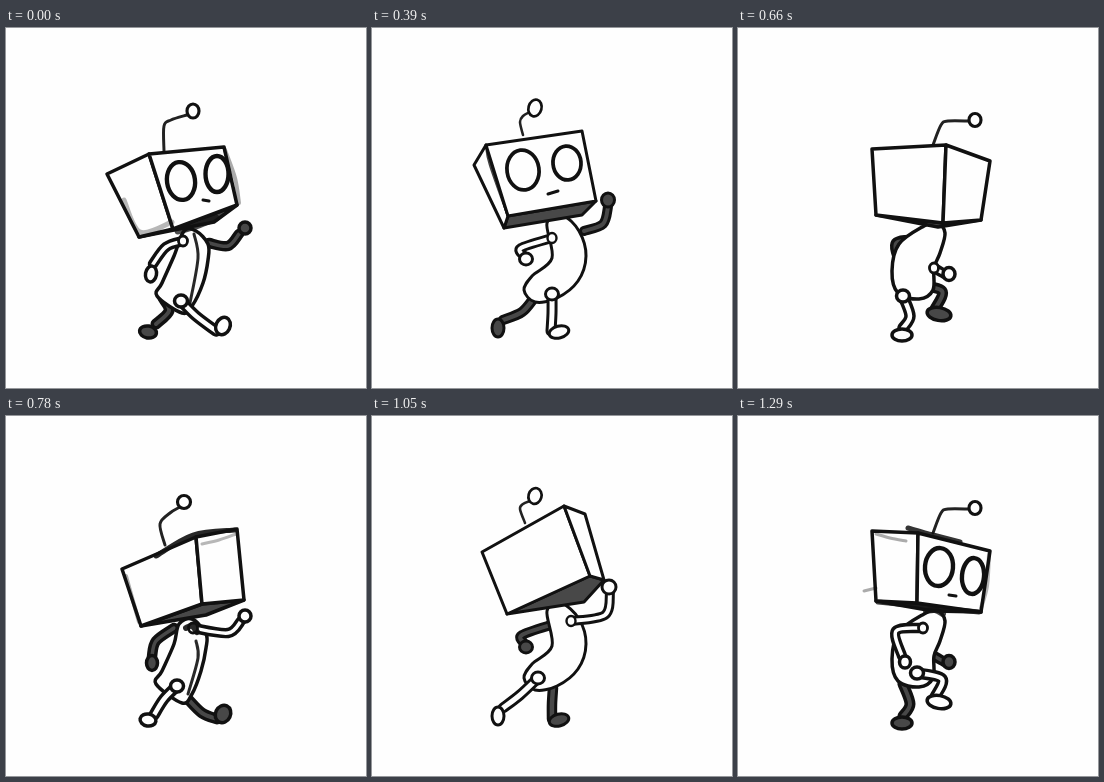
Animation, 360 px wide and 360 px high, one loop 1410 ms. Source, as an HTML page with a canvas:

```html
<!DOCTYPE html>
<html lang="en">
<head>
<meta charset="utf-8">
<title>Running robot</title>
<style>
  html, body { margin: 0; width: 100%; height: 100%; overflow: hidden; background: #fefefe; }
  canvas { display: block; width: 360px; height: 360px; }
</style>
</head>
<body>
<canvas id="stage"></canvas>
<script>
const INK = '#111', PAPER = '#fefefe', SHADE = '#484848';
const canvas = document.getElementById('stage');
const ctx = canvas.getContext('2d');
const ratio = window.devicePixelRatio || 1;
canvas.width = canvas.height = 360 * ratio;
ctx.scale(ratio, ratio);
ctx.lineCap = ctx.lineJoin = 'round';

// Turns every string of numbers inside a pose into an array
function parse(v) {
  if (typeof v === 'string') return v.split(' ').map(Number);
  if (Array.isArray(v)) return v.map(parse);
  if (v && typeof v === 'object')
    return Object.fromEntries(Object.entries(v).map(([k, x]) => [k, parse(x)]));
  return v;
}

function mix(a, b, t) {
  if (typeof a === 'number') return a + (b - a) * t;
  if (Array.isArray(a)) return a.map((x, i) => mix(x, b[i], t));
  return Object.fromEntries(Object.keys(a).map(k => [k, mix(a[k], b[k], t)]));
}

// box: TL TM TR BR BM BL + underside point; limbs: arm, hand, leg, foot
const robot = (lw, skull, body, near, far, marks = []) =>
  ({ ...parse({ lw, skull, body, near, far }), marks: parse(marks) });
const between = (a, b, t) => ({ ...mix({ ...a, marks: [] }, { ...b, marks: [] }, t) });
const swapLimbs = (p, skull, lw = p.lw) =>
  ({ ...p, lw, skull, near: p.far, far: p.near, marks: [] });

const strideFront = robot(3.5, {
  box: '101 146 143 126 218 119 231 177 167 201 133 209 208 194',
  wire: '158 123 158 98 165 92 181 87', ball: '187 83 6 7 0',
  face: { eyes: ['175 153 14 19 -8', '211 146 11.5 18 0'], mouth: '197 172 203 173' }
}, '178 203 190 203 202 216 202 232 197 255 186 278 176 285 151 268 156 255 168 228',
  ['177 213 160 219 147 236', '145 246 5.5 8 10', '175 273 190 288 210 303', '217 298 7 9 25'],
  ['203 215 222 218 233 206', '239 200 6 6 0', '157 270 163 283 150 296', '142 304 8.5 6 10'],
  [[5, .3, '118 172 134 204 166 194'], [4, .35, '219 122 229 150 233 175'],
   [7, .75, '172 203 190 198 210 190'], [3, .9, '188 206 192 230 184 275']]);

const pushFront = robot(3.2, {
  box: '102 135 134 116 211 114 228 173 154 190 128 201 205 191',
  wire: '156 113 154 97 159 92 168 87', ball: '174 83 6 8 0',
  face: { eyes: ['166 145 14 19 -5', '203 140 11 17 0'], mouth: '190 171 198 170' }
}, '173 193 189 188 202 203 206 228 202 252 186 272 165 273 151 260 158 247 174 225',
  ['178 211 142 216 131 234', '131 240 6 6.5 0', '178 267 185 285 194 304', '202 304 9 5 -30'],
  ['205 209 225 202 238 190', '244 185 6.5 6.5 0', '160 268 152 284 138 294', '134 302 6.5 9 0'],
  [[6, .85, '135 119 144 152 154 189'], [6, .85, '211 122 218 140 227 171'],
   [2, .5, '156 146 162 155 176 160']]);

const leanFront = robot(3, {
  box: '102 137 114 117 210 103 224 173 136 188 132 200 210 187',
  wire: '151 107 148 94 151 88 158 84', ball: '163 80 6.5 8.5 15',
  face: { eyes: ['151 142 16 20 -8', '195 135 14 17 -5'], mouth: '176 166 186 163' }
}, '175 195 191 188 207 203 214 228 206 253 185 270 163 274 152 262 160 248 180 230',
  ['180 210 149 220 152 228', '154 231 6.5 6 0', '180 266 180 285 179 303', '187 304 10 6 -15'],
  ['212 203 231 196 236 179', '236 172 6.5 7 0', '162 270 150 284 131 292', '126 300 6 9 0'],
  [[2.5, .8, '114 117 118 137 136 188']]);

const passFront = robot(2.5, {
  box: '106 137 136 121 221 108 234 177 160 184 137 201 210 191',
  wire: '156 111 152 98 158 93 167 88', ball: '173 82 8 8.5 0',
  face: { eyes: ['166 142 15 18 0', '205 136 14 15 0'], mouth: '191 172 201 171' }
}, '182 197 194 189 204 200 207 225 202 250 191 268 170 270 154 255 157 238 172 212',
  ['180 210 160 230 176 241', '181 243 5.5 6 0', '177 267 184 281 172 299', '174 306 10 5.5 0'],
  ['206 214 217 227 236 215', '244 213 7 7 0', '188 270 184 281 161 285', '153 290 5.5 9 15']);

const strideBack = robot(3.5, {
  box: '116 153 190 121 231 113 238 184 196 188 135 210 200 199',
  wire: '159 129 154 108 164 97 174 91', ball: '178 86 6.5 6.5 0'
}, '173 208 186 203 200 218 200 232 195 255 186 278 176 287 150 268 156 255 168 228',
  ['187 212 222 217 235 205', '239 200 6 6 0', '171 270 158 283 148 299', '142 304 8 6 10'],
  ['168 212 150 225 146 240', '146 247 5.5 7.5 0', '181 282 196 297 211 303', '217 298 7.5 9 25'],
  [[5, .9, '150 140 187 119 229 114'], [3, .3, '196 128 213 124 230 118'],
   [4, .35, '120 160 127 185 133 206'], [6, .9, '180 212 186 210 191 216'],
   [3, .9, '190 225 192 242 182 278']]);

const leanBack = robot(3, {
  box: '110 136 192 90 218 161 218 161 218 161 135 198 208 186',
  wire: '153 107 148 93 151 88 158 85', ball: '163 80 6.5 8 15'
}, '175 195 189 187 207 203 214 228 206 253 185 270 163 274 152 262 160 248 180 230',
  ['199 205 233 199 238 176', '237 171 7 7 0', '166 262 148 279 131 292', '126 300 6 9 0'],
  ['182 208 150 219 152 227', '154 231 6.5 6 0', '181 272 180 288 180 303', '187 304 10 6 -15']);
leanBack.skull.box = parse('110 136 192 90 213 98 232 164 218 160 135 198 212 186');

const passHigh = robot(3.5, {
  box: '134 115 180 117 252 135 243 196 179 187 138 185 195 195',
  wire: '195 117 203 97 210 93 231 93', ball: '237 92 6 6.5 0',
  face: { eyes: ['201 151 14 19 5', '235 160 11 18 5'], mouth: '211 179 218 180' }
}, '186 198 199 194 207 205 202 225 196 240 195 262 181 271 160 265 154 243 161 216',
  ['185 212 158 215 164 240', '167 246 5.5 6 0', '179 257 204 263 197 281', '201 286 12 6.5 10'],
  ['196 240 203 244 207 246', '211 246 6 6.5 0', '165 268 172 288 165 300', '164 307 10 6 0'],
  [[5, .85, '170 112 195 119 222 126'], [3, .35, '126 175 138 172'],
   [4, .3, '251 138 249 170 243 192'], [3, .35, '138 118 152 122 168 125'],
   [6, .8, '188 195 197 194 205 198'], [5, .8, '140 186 180 190 241 196']]);

const highBackSkull = {
  ...passHigh.skull, face: undefined,
  box: parse('134 121 208 117 252 133 243 192 205 195 138 187 200 199')
};
const pushBack = between(strideBack, leanBack, .5);
const passBackSkull = mix(strideBack.skull, leanBack.skull, .6);

const steps = [
  [150, strideFront],
  [120, between(strideFront, pushFront, .5)],
  [120, pushFront],
  [150, leanFront],
  [120, passFront],
  [120, swapLimbs(passHigh, highBackSkull)],
  [120, strideBack],
  [150, pushBack],
  [120, leanBack],
  [120, swapLimbs(passFront, passBackSkull, 3)],
  [120, passHigh]
];
const loop = steps.reduce((sum, [ms]) => sum + ms, 0);

function paint(fill, width, color = INK) {
  if (fill) { ctx.fillStyle = fill; ctx.fill(); }
  if (width) { ctx.strokeStyle = color; ctx.lineWidth = width; ctx.stroke(); }
}

const pairs = flat => Array.from({ length: flat.length / 2 }, (_, i) => [flat[2 * i], flat[2 * i + 1]]);

// Catmull-Rom curve through the points
function curve(flat, closed) {
  const p = pairs(flat), n = p.length;
  const at = i => closed ? p[(i + n) % n] : p[Math.max(0, Math.min(n - 1, i))];
  ctx.beginPath();
  ctx.moveTo(...p[0]);
  for (let i = 0; i < (closed ? n : n - 1); i++) {
    const [a, b, c, d] = [at(i - 1), at(i), at(i + 1), at(i + 2)];
    ctx.bezierCurveTo(b[0] + (c[0] - a[0]) / 6, b[1] + (c[1] - a[1]) / 6,
      c[0] - (d[0] - b[0]) / 6, c[1] - (d[1] - b[1]) / 6, ...c);
  }
}

function polygon(points, fill, width) {
  ctx.beginPath();
  points.forEach(p => ctx.lineTo(...p));
  ctx.closePath();
  paint(fill, width);
}

function oval([x, y, rx, ry, turn = 0], fill, width) {
  ctx.beginPath();
  ctx.ellipse(x, y, rx, ry, turn * Math.PI / 180, 0, 7);
  paint(fill, width);
}

function limb(path, end, thick, fill, lw) {
  curve(path);
  paint(null, thick + lw);
  paint(null, thick - lw, fill);
  oval(end, fill, lw);
}

function drawSkull({ box, wire, ball, face }, lw) {
  const [tl, tm, tr, br, bm, bl, under] = pairs(box);
  curve(wire);
  paint(null, lw * .85, '#222');
  oval(ball, PAPER, lw * .9);
  polygon([bl, bm, br, under], SHADE, lw);
  polygon([tl, tm, bm, bl], PAPER, lw);
  polygon([tm, tr, br, bm], PAPER, lw);
  if (!face) return;
  face.eyes.forEach(eye => oval(eye, PAPER, lw * 1.25));
  curve(face.mouth);
  paint(null, 3);
}

function draw({ lw, skull, body, near, far, marks }) {
  ctx.fillStyle = PAPER;
  ctx.fillRect(0, 0, 360, 360);
  limb(far[2], far[3], 7.5, SHADE, lw);
  limb(far[0], far[1], 7, SHADE, lw);
  curve(body, true);
  paint(PAPER, lw);
  limb(near[2], near[3], 8, PAPER, lw);
  oval([near[2][0], near[2][1], 6.5, 6], PAPER, lw);
  drawSkull(skull, lw);
  limb(near[0], near[1], 7, PAPER, lw);
  oval([near[0][0], near[0][1], 4.5, 5], PAPER, lw * .8);
  for (const [width, alpha, path] of marks) {
    curve(path);
    paint(null, width, `rgba(17,17,17,${alpha})`);
  }
}

function stepAt(time) {
  let i = 0;
  while (time >= steps[i][0]) time -= steps[i++][0];
  return i;
}

const start = performance.now();
let shown = -1;
function tick() {
  const i = stepAt((performance.now() - start) % loop);
  if (i !== shown) draw(steps[shown = i][1]);
  requestAnimationFrame(tick);
}
tick();
</script>
</body>
</html>
```
